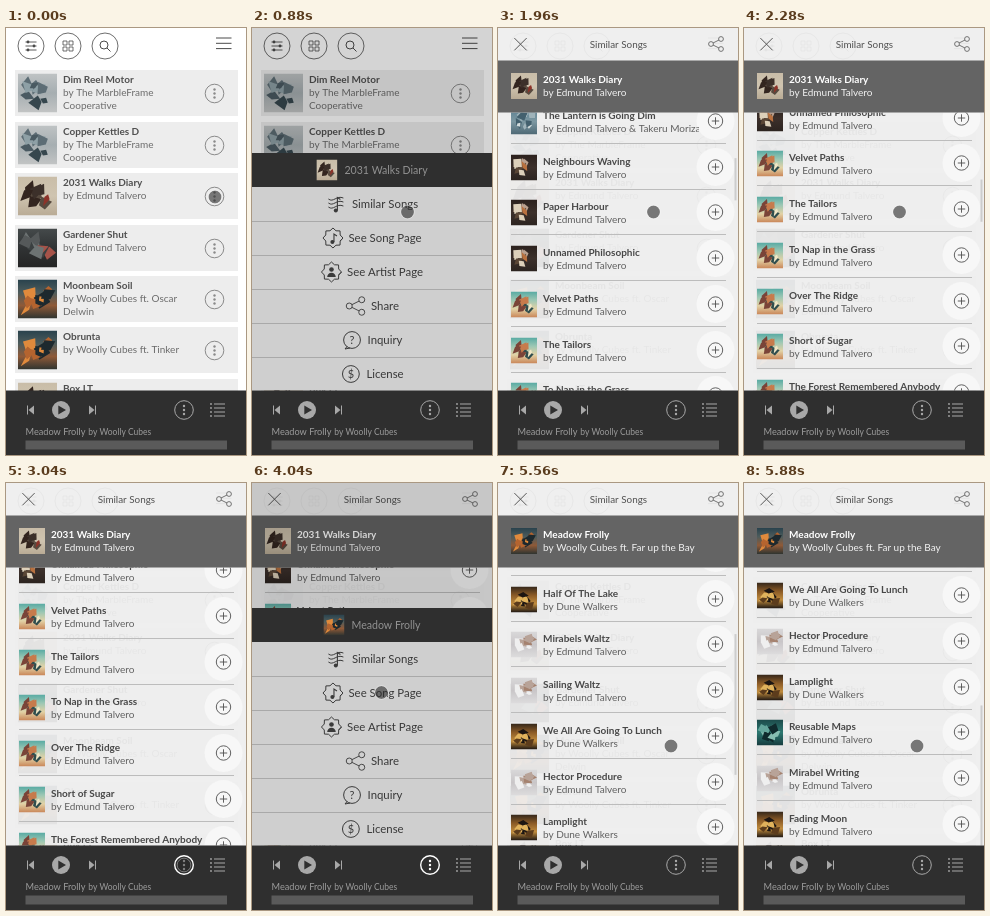
An HTML page with a canvas for the animation above (6000 ms loop, 240 px wide and 427 px high).

```html
<!DOCTYPE html>
<html lang="en">
<head>
<meta charset="utf-8">
<title>Music player</title>
<style>
html, body { margin: 0; width: 100%; height: 100%; overflow: hidden; background: #fff; }
canvas { display: block; width: 240px; height: 427px; }
</style>
</head>
<body>
<canvas id="stage"></canvas>
<script>
const W = 240, H = 427, LOOP = 6000, BAR = 362.5, TOP = 84.5, PITCH = 45.75;
const FONT = 'Lato, "Open Sans", sans-serif';
const canvas = document.getElementById('stage');
const c = canvas.getContext('2d');
const dpr = window.devicePixelRatio || 1;
canvas.width = W * dpr;
canvas.height = H * dpr;

// Covers: background tones from top to bottom | tones of the scattered shapes
const COVERS = {
  gem: '#bfc3c4 #a6aeb1 #c2c4c4|#5d6d75 #36474e #8ea0a6 #4a5a62',
  beige: '#c9bda8 #cfc4b0 #b9ab95|#33251f #574a3f #8d3329 #3c302a',
  slate: '#454a4b #303334 #242424|#6d7373 #3b4041 #a65349 #55595a',
  dusk: '#29424d #4d5c5c #8f5a38 #2f3430|#e08a3c #1d292e #b5642f',
  amber: '#2b211d #3c302b #2c2420|#ddd0ba #b9a08f #5a4636 #b9713f',
  beach: '#57aaa3 #9cc7b4 #e2d2a6 #c98557|#7a4438 #2f4d4d #f0e5c4 #c77b4c',
  deep: '#8db0b0 #36525a #1d2226|#1d2226 #b96a42 #27383d',
  noon: '#5b7f90 #7d98a2 #4d6874|#d3dcdd #9fb3ba #43606e',
  crowd: '#33261a #8a5a26 #c08c3e #1c1512|#e0b25c #1c1512 #5c3c1c',
  pale: '#d9d8d9 #c9c6c8 #dddcdd|#a5826f #efefef #b8a398',
  teal: '#1c4a4a #2c7770 #173c3f|#86bdb1 #63a59b #0f2a2d'
};

const ED = 'Edmund Talvero', CO = 'The MarbleFrame Cooperative', CUBES = 'Woolly Cubes', DUNE = 'Dune Walkers';
const HOME = [
  ['gem', 'Dim Reel Motor', 'The MarbleFrame', 'Cooperative'],
  ['gem', 'Copper Kettles D', 'The MarbleFrame', 'Cooperative'],
  ['beige', '2031 Walks Diary', ED],
  ['slate', 'Gardener Shut', ED],
  ['dusk', 'Moonbeam Soil', CUBES + ' ft. Oscar', 'Delwin'],
  ['dusk', 'Obrunta', CUBES + ' ft. Tinker'],
  ['beige', 'Box LT', ED]
];
const FIRST = {
  head: ['beige', '2031 Walks Diary', ED], count: 40,
  rows: [
    ['slate', 'Gardener Shut', ED], ['amber', 'Unnamed Philosophic Whole', ED],
    ['beach', 'Distant Rungs', ED], ['gem', 'Wakes', CO], ['gem', 'Fig Jam Caper', CO],
    ['deep', 'Absence', ED], ['noon', 'The Lantern is Going Dim', ED + ' & Takeru Morizane'],
    ['amber', 'Neighbours Waving', ED], ['amber', 'Paper Harbour', ED], ['amber', 'Unnamed Philosophic', ED],
    ['beach', 'Velvet Paths', ED], ['beach', 'The Tailors', ED], ['beach', 'To Nap in the Grass', ED],
    ['beach', 'Over The Ridge', ED], ['beach', 'Short of Sugar', ED],
    ['beach', 'The Forest Remembered Anybody', ED]
  ]
};
const SECOND = {
  head: ['dusk', 'Meadow Frolly', CUBES + ' ft. Far up the Bay'], count: 12,
  rows: [
    ['dusk', 'Obrunta', CUBES + ' ft. Tinker'], ['gem', 'Avikolo', 'Tinker ft. Tinker'],
    ['crowd', 'Plnkt Grmml', DUNE], ['crowd', 'Half Of The Lake', DUNE],
    ['pale', 'Mirabels Waltz', ED], ['pale', 'Sailing Waltz', ED],
    ['crowd', 'We All Are Going To Lunch', DUNE], ['pale', 'Hector Procedure', ED],
    ['crowd', 'Lamplight', DUNE], ['teal', 'Reusable Maps', ED],
    ['pale', 'Mirabel Writing', ED], ['crowd', 'Fading Moon', ED]
  ]
};
// Pointer moves: begin, end, target x, target y
const MOVES = [[520, 860, 155.5, 184], [2600, 2960, 178, 382], [3840, 4110, 120, 176], [5000, 5200, 173, 263]];

const ramp = (t, a, b) => {
  const u = Math.min(1, Math.max(0, (t - a) / (b - a)));
  return u * u * (3 - 2 * u);
};
const rect = (x, y, w, h, col) => { c.fillStyle = col; c.fillRect(x, y, w, h); };
const stroke = (col, w = 1) => { c.strokeStyle = col; c.lineWidth = w; c.stroke(); };
function disc(x, y, r, col) {
  c.beginPath(); c.arc(x, y, r, 0, 7); c.fillStyle = col; c.fill();
}
function ring(x, y, r, col, w) {
  c.beginPath(); c.arc(x, y, r, 0, 7); stroke(col, w);
}
function trace(p) {
  c.beginPath();
  for (let i = 0; i < p.length; i += 2) c.lineTo(p[i], p[i + 1]);
}
function line(col, w, ...p) { trace(p); stroke(col, w); }
function poly(col, ...p) { trace(p); c.fillStyle = col; c.fill(); }
function text(s, x, y, size, col, weight = 400) {
  c.font = `${weight} ${size}px ${FONT}`;
  c.fillStyle = col;
  c.fillText(s, x, y);
}
function width(s, size) {
  c.font = `400 ${size}px ${FONT}`;
  return c.measureText(s).width;
}
function at(x, y, draw) {
  c.save(); c.translate(x, y); draw(); c.restore();
}
function clipped(x, y, w, h, draw) {
  c.save(); c.beginPath(); c.rect(x, y, w, h); c.clip(); draw(); c.restore();
}
function random(seed) {
  return () => (seed = seed * 16807 % 2147483647) / 2147483647;
}

function cover(name, x, y, size) {
  const [tones, marks] = COVERS[name].split('|').map(s => s.split(' '));
  const rnd = random(name.charCodeAt(0) * 7919 + name.length);
  const grad = c.createLinearGradient(0, 0, 0, size);
  tones.forEach((col, i) => grad.addColorStop(i / (tones.length - 1), col));
  clipped(x, y, size, size, () => at(x, y, () => {
    rect(0, 0, size, size, grad);
    c.scale(size, size);
    for (let i = 0; i < 9; i++) {
      const px = .2 + .6 * rnd(), py = .25 + .5 * rnd(), turn = 6 * rnd(), p = [];
      for (let k = 0; k < 4; k++) {
        const a = turn + k * Math.PI / 2, r = .06 + .2 * rnd();
        p.push(px + r * Math.cos(a), py + r * Math.sin(a));
      }
      poly(marks[i % marks.length], ...p);
    }
  }));
}

function dots(x, y, col, w = 1) {
  ring(x, y, 9.3, col, w);
  for (const d of [-4, 0, 4]) disc(x, y + d, 1.2, col);
}
function share(x, y, s, col, back) {
  line(col, .9, x + 5 * s, y - 5 * s, x - 5 * s, y, x + 5 * s, y + 5 * s);
  for (const d of [-1, 0, 1]) {
    const px = x + (d ? 5 : -5) * s, py = y + 5 * d * s;
    disc(px, py, 2.4 * s, back);
    ring(px, py, 2.4 * s, col, .9);
  }
}
function cross(x, y, r, turn, col) {
  at(x, y, () => {
    c.rotate(turn);
    line(col, .9, -r, 0, r, 0);
    line(col, .9, 0, -r, 0, r);
  });
}

function home() {
  const ink = '#4a4a4a';
  rect(0, 0, W, H, '#fff');
  for (const x of [25, 62, 99]) ring(x, 18, 13, ink, .8);
  for (const d of [-1, 0, 1]) {
    line(ink, .9, 19.5, 18 + 4 * d, 30.5, 18 + 4 * d);
    disc(25 + (d ? -3 : 3), 18 + 4 * d, 1.4, ink);
    line(ink, 1, 210, 15.3 + 5.3 * d, 225.5, 15.3 + 5.3 * d);
  }
  c.beginPath();
  for (const x of [57, 63]) for (const y of [13, 19]) c.rect(x, y, 4, 4);
  stroke(ink, .8);
  ring(98, 17, 4, ink);
  line(ink, 1, 101, 20, 104.5, 23.5);
  HOME.forEach(([art, title, by, more], i) => {
    const y = Math.round(42.3 + i * 51.4);
    rect(9, y, 223, 46, '#ededed');
    cover(art, 12, y + 3.5, 39);
    text(title, 57, y + 13, 10, '#505050', 700);
    text('by ' + by, 57, y + 26, 10, '#6c6c6c');
    if (more) text(more, 57, y + 39, 10, '#6c6c6c');
    dots(208.5, y + 23.5, '#8a8a8a');
  });
}

function song([art, title, by], y, col, sub) {
  cover(art, 13, y - 13, 26);
  clipped(13, y - 22, 188, 44, () => {
    text(title, 45, y - 3, 10, col, 700);
    text('by ' + by, 45, y + 10, 10, sub);
  });
}

function panel(list, scroll, thumb, alpha) {
  const ink = '#505050';
  c.globalAlpha = alpha;
  rect(0, 0, W, BAR, 'rgba(239,239,239,.94)');
  cross(22.5, 16.2, 8.7, Math.PI / 4, ink);
  text('Similar Songs', 91.7, 19.7, 9.9, ink);
  share(218, 16, 1, '#666', '#efefef');
  clipped(0, TOP, W, BAR - TOP, () => {
    list.rows.forEach((row, i) => {
      const y = Math.round(106 + i * PITCH - scroll);
      if (y < 50 || y > 400) return;
      disc(217.5, y, 19, '#f7f7f7');
      song(row, y + .5, '#484848', '#606060');
      ring(217.5, y, 7.2, ink, .9);
      cross(217.5, y, 3.7, 0, ink);
      rect(13, y + 22, 215, 1, '#bcbcbc');
    });
    const view = BAR - TOP, full = list.count * PITCH;
    rect(236.5, TOP + 2 + scroll / full * view, 2, view * view / full, `rgba(205,205,205,${thumb})`);
  });
  rect(0, 32.5, W, TOP - 32.5, '#646464');
  song(list.head, 58, '#fff', '#f2f2f2');
  c.globalAlpha = 1;
}

function burst(col) {
  const p = [];
  for (let i = 0; i <= 17; i++) {
    const r = i % 2 ? 7.8 : 10, a = i * Math.PI / 8;
    p.push(r * Math.cos(a), r * Math.sin(a));
  }
  line(col, 1, ...p);
}
function note(col, h) {
  line(col, 1.1, 1, h, 1, -h, 4, 2 - h);
  disc(-.6, h, 2, col);
}
function letter(s, col) {
  ring(0, 0, 8.4, col, 1);
  text(s, -width(s, 11) / 2, 4, 11, col);
}
// Menu labels, each with a function that draws its icon around the origin
const ITEMS = [
  ['Similar Songs', col => {
    for (const d of [-5, -1, 3]) {
      c.beginPath();
      c.moveTo(-8, d);
      c.bezierCurveTo(-3, d + 4, 0, d - 4, 7, d - 1);
      stroke(col, 1);
    }
    note(col, 6.5);
  }],
  ['See Song Page', col => { burst(col); note(col, 4); }],
  ['See Artist Page', col => {
    burst(col);
    disc(0, -2.5, 2.3, col);
    c.beginPath(); c.arc(0, 5, 4.3, Math.PI, 0); c.fill();
  }],
  ['Share', col => share(0, 0, 1.25, col, '#cfcfcf')],
  ['Inquiry', col => { letter('?', col); line(col, 1, -5, 6.5, -7, 9, -2, 8); }],
  ['License', col => letter('$', col)]
];

function menu(open, [art, title]) {
  if (!open) return;
  clipped(0, 0, W, BAR, () => {
    rect(0, 0, W, BAR, `rgba(0,0,0,${.17 * open})`);
    c.translate(0, (1 - open) * 238);
    rect(0, 125, W, 34, '#2f2f2f');
    const x = (W - 28 - width(title, 10.6)) / 2;
    cover(art, x, 131.5, 21);
    text(title, x + 28, 146, 10.6, '#929292');
    rect(0, 159, W, 204, '#cfcfcf');
    ITEMS.forEach(([label, icon], i) => {
      const y = 176 + i * 34, left = (W - 24 - width(label, 11.4)) / 2;
      at(left + 9.5, y, () => icon('#3a3a3a'));
      text(label, left + 25, y + 4, 11.4, '#383838');
      if (i) rect(0, y - 17, W, 1, '#a9a9a9');
    });
  });
}

function skip(x, dir, col) {
  at(x, 382, () => {
    c.scale(dir, 1);
    poly(col, -3, -4.5, 2.5, 0, -3, 4.5);
    line(col, 1, 3.5, -4.5, 3.5, 4.5);
  });
}

function bar(active) {
  const ink = '#a8a8a8';
  rect(0, BAR, W, H - BAR, '#2f2f2f');
  skip(25, -1, ink);
  skip(86, 1, ink);
  disc(55, 382, 9, ink);
  poly('#2f2f2f', 52.3, 377.5, 60, 382, 52.3, 386.5);
  dots(178, 382, active ? '#fff' : ink, active ? 1.4 : 1);
  for (let y = 376; y < 389; y += 4) {
    disc(205, y, .9, ink);
    line(ink, 1, 208, y, 219, y);
  }
  const title = 'Meadow Frolly ';
  text(title, 19.5, 407, 9.2, '#9c9c9c');
  text('by ' + CUBES, 20 + width(title, 9.2), 407, 8.5, '#9c9c9c');
  rect(19.5, 412.5, 201.5, 9, '#5a5a5a');
}

function pointer(t) {
  let x = 209, y = 169;
  for (const [a, b, tx, ty] of MOVES) {
    const u = ramp(t, a, b);
    x += (tx - x) * u;
    y += (ty - y) * u;
  }
  disc(x, y, 6.5, 'rgba(40,40,40,.6)');
  ring(x, y, 6.8, 'rgba(255,255,255,.45)', .8);
}

function draw(now) {
  const t = now % LOOP;
  c.setTransform(dpr, 0, 0, dpr, 0, 0);
  home();
  menu(ramp(t, 60, 440) - ramp(t, 900, 1080), FIRST.head);
  const in1 = ramp(t, 1060, 1260), in2 = ramp(t, 4640, 4840);
  if (in1 && in2 < 1) {
    const thumb = ramp(t, 1300, 1400) - ramp(t, 2500, 2800);
    panel(FIRST, 430.75 * ramp(t, 1383, 2325), thumb, in1);
  }
  if (in2) panel(SECOND, 268.5 * ramp(t, 5300, 5840), ramp(t, 5180, 5260), in2);
  menu(ramp(t, 3260, 3640) - ramp(t, 4220, 4420), SECOND.head);
  bar(t >= 2960 && t < 4420);
  pointer(t);
}

const start = performance.now();
function frame() {
  draw(performance.now() - start);
  requestAnimationFrame(frame);
}
frame();
</script>
</body>
</html>
```
